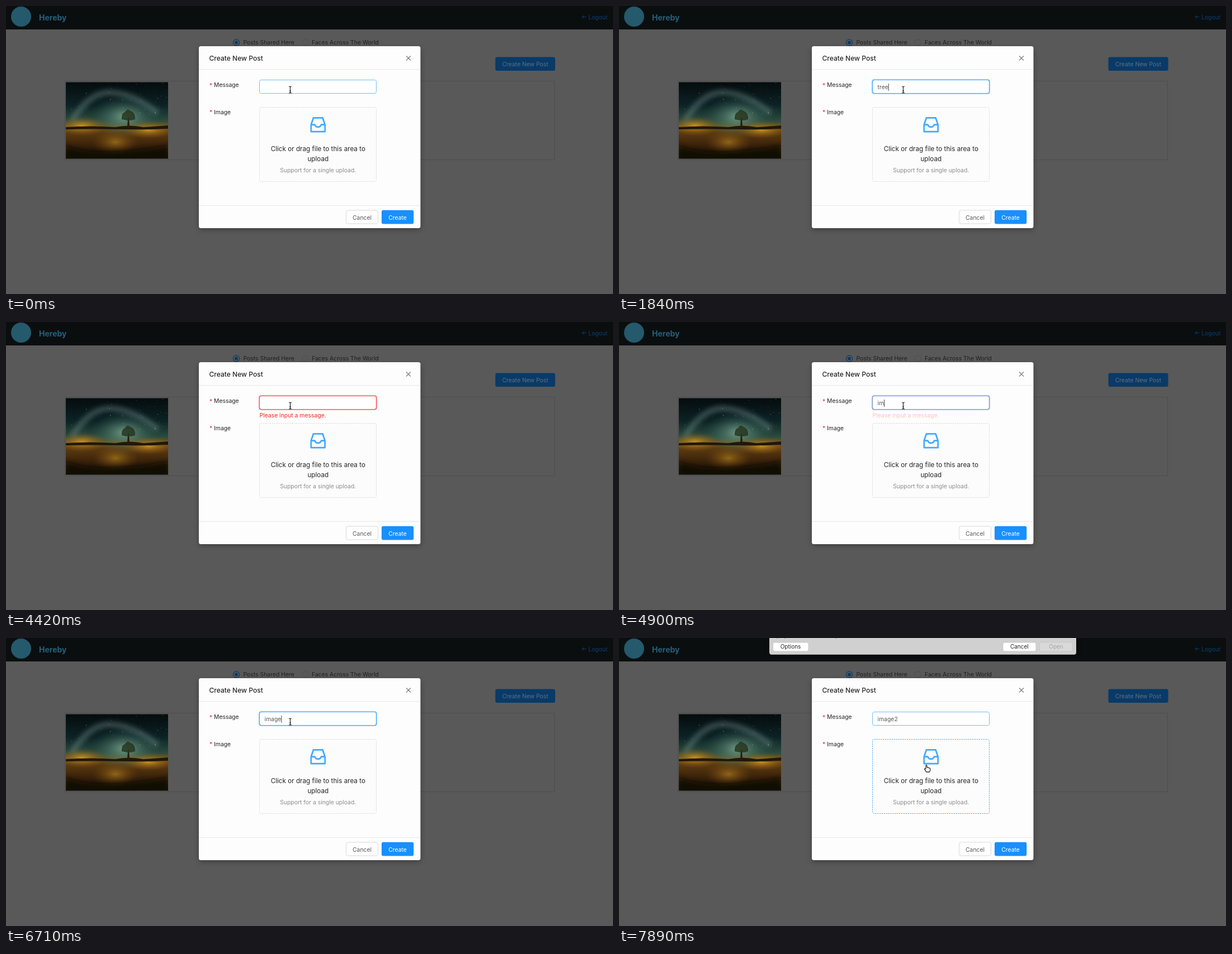
Animation, 1086 px wide and 516 px high, one loop 8 s. Source, as an HTML page:

```html
<!DOCTYPE html>
<html lang="en">
<head>
<meta charset="utf-8">
<title>Create New Post</title>
<style>
  html, body { margin: 0; width: 100%; height: 100%; overflow: hidden; background: #595959; }
  svg { display: block; width: 100vw; height: 100vh; }
  text { font: 10.4px Inter, "Open Sans", sans-serif; fill: #262626; white-space: pre; }
  .mid { text-anchor: middle; }
  .dim { fill: #1f1f1f; }
  .required { fill: #f5222d; }
  .line { fill: none; stroke: #e8e8e8; }
  .lead { font-size: 11.7px; }
</style>
</head>
<body>
<svg viewBox="0 0 1086 516">
  <defs>
    <linearGradient id="sky" x2="0" y2="1">
      <stop offset="0" stop-color="#050b0d"/>
      <stop offset=".3" stop-color="#0c2225"/>
      <stop offset=".5" stop-color="#2a4a3d"/>
      <stop offset=".58" stop-color="#6a5a20"/>
      <stop offset=".66" stop-color="#5b3a10"/>
      <stop offset=".82" stop-color="#3a220a"/>
      <stop offset="1" stop-color="#0e0a06"/>
    </linearGradient>
    <radialGradient id="mint">
      <stop offset="0" stop-color="#7fa892" stop-opacity=".85"/>
      <stop offset="1" stop-color="#2a5a50" stop-opacity="0"/>
    </radialGradient>
    <radialGradient id="amber">
      <stop offset="0" stop-color="#d09a22" stop-opacity=".9"/>
      <stop offset="1" stop-color="#8a5010" stop-opacity="0"/>
    </radialGradient>
    <clipPath id="photoClip"><rect x="107" y="136.5" width="183" height="137"/></clipPath>
    <filter id="soft" x="-30%" y="-30%" width="160%" height="160%"><feGaussianBlur stdDeviation="4"/></filter>
    <filter id="shade" x="-10%" y="-10%" width="120%" height="120%"><feGaussianBlur stdDeviation="5"/></filter>
  </defs>

  <!-- dimmed page -->
  <rect width="1086" height="516" fill="#595959"/>
  <rect width="1086" height="42" fill="#0b0e0f"/>
  <circle cx="27" cy="19" r="18" fill="#25596c"/>
  <text x="59" y="25.5" style="font-size:14px;font-weight:700;fill:#25607a">Hereby</text>
  <path d="M1038 19.5h-7m3-3-3 3 3 3" fill="none" stroke="#0a3f75"/>
  <text x="1042" y="23.5" style="fill:#0a3f75">Logout</text>

  <circle cx="412" cy="65.5" r="5.6" fill="none" stroke="#093a68" stroke-width="1.1"/>
  <circle cx="412" cy="65.5" r="3" fill="#093a68"/>
  <circle cx="535" cy="65.5" r="5.6" fill="none" stroke="#4f4f4f"/>
  <text class="dim" x="424.5" y="69.3">Posts Shared Here</text>
  <text class="dim" x="547" y="69.3">Faces Across The World</text>
  <rect x="875.5" y="91.5" width="107" height="24.5" rx="3" fill="#093a68"/>
  <text class="mid" x="929" y="107.6" style="fill:#64707b">Create New Post</text>
  <rect x="105.5" y="134.5" width="876" height="141" fill="none" stroke="#4d4d4d"/>

  <g clip-path="url(#photoClip)">
    <rect x="107" y="136" width="183" height="138" fill="url(#sky)"/>
    <ellipse cx="212" cy="198" rx="62" ry="38" fill="url(#mint)"/>
    <path d="M118 206Q150 152 190 155T272 192" fill="none" stroke="#7c9c98" stroke-width="10" opacity=".4" filter="url(#soft)"/>
    <ellipse cx="136" cy="215" rx="46" ry="18" fill="url(#amber)"/>
    <ellipse cx="255" cy="222" rx="48" ry="16" fill="url(#amber)"/>
    <ellipse cx="196" cy="244" rx="42" ry="22" fill="url(#amber)" opacity=".6"/>
    <g id="stars" fill="#b8c8c4"></g>
    <path d="M107 217Q150 214 196 217Q220 212 246 217L290 214V220Q240 222 218 221Q150 220 107 221Z" fill="#21170a"/>
    <path d="M217 218L218 200H220L221 218Z" fill="#2a1a0a"/>
    <path d="M207 203Q206 192 213 190Q217 182 223 188Q232 191 231 203Q222 207 207 203Z" fill="#26351d" opacity=".85"/>
    <path d="M107 273V250Q135 262 180 262T290 250V274Z" fill="#0d0905" opacity=".8" filter="url(#soft)"/>
  </g>

  <!-- modal -->
  <rect x="345" y="76" width="397" height="325" rx="4" opacity=".3" filter="url(#shade)"/>
  <rect x="345" y="72" width="396.5" height="326" rx="3.5" fill="#fdfdfd"/>
  <path class="line" d="M345 113.5h396.5M345 357.5h396.5"/>
  <text x="363.5" y="97.7" style="font-size:12.05px;font-weight:500">Create New Post</text>
  <path d="M716 89.5l8 8m0-8-8 8" stroke="#7d7d7d" stroke-width="1.2"/>
  <text class="required" x="364" y="145.5">*</text>
  <text x="372" y="145">Message</text>
  <text class="required" x="364" y="194.3">*</text>
  <text x="372" y="193.8">Image</text>

  <rect x="453.5" y="132.5" width="209" height="24" rx="3" fill="#fff" stroke="#70bdfc"/>
  <g id="focusRing" fill="none" stroke="#1890ff">
    <rect x="452.5" y="131.5" width="211" height="26" rx="4" stroke-width="1.5" opacity=".3"/>
    <rect x="453.5" y="132.5" width="209" height="24" rx="3" stroke="#40a9ff" stroke-width="1.2"/>
  </g>
  <g id="errorState">
    <g fill="none" stroke="#f5222d">
      <rect x="452.5" y="131.5" width="211" height="26" rx="4" stroke-width="1.5" opacity=".3"/>
      <rect x="453.5" y="132.5" width="209" height="24" rx="3" stroke="#ff4d4f" stroke-width="1.2"/>
    </g>
    <text class="required" x="453.5" y="171">Please input a message.</text>
  </g>
  <text id="message" x="462.5" y="149.3" style="fill:#595959"></text>
  <rect id="caret" y="139" width="1" height="13" fill="#444"/>

  <rect id="dropArea" x="453.5" y="181.5" width="209" height="133" rx="3" fill="#fcfcfc" stroke-dasharray="2.3 1.6"/>
  <g fill="none" stroke="#40a9ff" stroke-width="2.7" stroke-linejoin="round">
    <path d="M550 200.3h16.5l4.2 12.4v12.4h-24.9v-12.4z"/>
    <path d="M546 212.7h6.5q1.5 4.2 5.7 4.2t5.7-4.2h6.5"/>
  </g>
  <text class="mid lead" x="558.3" y="259.8">Click or drag file to this area to</text>
  <text class="mid lead" x="558.3" y="278">upload</text>
  <text class="mid" x="558.2" y="298" style="fill:#8c8c8c">Support for a single upload.</text>

  <rect x="608.5" y="366" width="57" height="24" rx="3" fill="#fff" stroke="#d9d9d9"/>
  <text class="mid" x="637" y="382.6" style="fill:#595959">Cancel</text>
  <rect x="672" y="365.7" width="57.3" height="24.7" rx="3" fill="#1890ff"/>
  <text class="mid" x="700.6" y="382.6" style="fill:#fff">Create</text>

  <!-- file sheet -->
  <g id="sheet">
    <rect x="268" y="-10" width="551" height="41.5" rx="5" opacity=".3" filter="url(#shade)"/>
    <rect x="269" y="-10" width="549" height="39.7" rx="4" fill="#d0d0d0"/>
    <path d="M282 .5h2m12 0h2m89 0h2" stroke="#8c8c8c"/>
    <g fill="#fff" stroke="#b9b9b9" stroke-width=".6">
      <rect x="275.5" y="8" width="63.5" height="15.8" rx="3"/>
      <rect x="687" y="8" width="59" height="15.8" rx="3"/>
      <rect x="752.5" y="8" width="59" height="15.8" rx="3" fill="#d9d9d9" stroke="#c0c0c0"/>
    </g>
    <text class="mid" x="307" y="19.4" style="font-size:10px">Options</text>
    <text class="mid" x="716.3" y="19.4" style="font-size:10px">Cancel</text>
    <text class="mid" x="782" y="19.4" style="font-size:10px;fill:#a6a6a6">Open</text>
  </g>

  <!-- pointers, hot spot near the origin -->
  <g id="pointer">
    <path id="beam" d="M-2.5-6Q0-6 0-4.5Q0-6 2.5-6M0-4.5V4.5M-2.5 6Q0 6 0 4.5Q0 6 2.5 6M-1.5 2h3" fill="none" stroke="#111" stroke-width="1.1"/>
    <path id="arrow" d="M-2-6V5L.5 2.6 2.2 6.4 3.8 5.7 2.2 2H5.6Z" fill="#111" stroke="#fff" stroke-width=".8"/>
    <path id="hand" d="M-2.6 1.2V-5Q-1.6-7-.5-5V-1.3Q.8-2.4 1.6-.9Q2.8-1.8 3.5-.4Q5.3-.9 5.3 1V3.4L4 6.6H-1.5L-5 1.6Q-5.2-.4-2.6 1.2Z" fill="#fff" stroke="#111" stroke-width="1.1" stroke-linejoin="round"/>
  </g>
</svg>
<script>
  const LOOP = 8000, STEP = 151.5;
  const el = id => document.getElementById(id);
  const [message, caret, focusRing, errorState, dropArea, sheet, pointer] =
    ['message', 'caret', 'focusRing', 'errorState', 'dropArea', 'sheet', 'pointer'].map(el);

  const keys = [
    [250, ''], [650, 't'], [950, 'tr'], [1250, 'tre'], [1400, 'tree'],
    [2980, 'tre'], [3250, 'tr'], [3500, 't'], [3750, ''],
    [4650, 'i'], [4800, 'im'], [4900, 'ima'], [5000, 'imag'],
    [6300, 'image'], [6800, 'image2']
  ];
  const FOCUS = 250, BLUR = 7400, ERROR = 3750, FIXED = 4650;

  const clamp = v => Math.min(1, Math.max(0, v));
  const ease = v => v * v * (3 - 2 * v);
  const ramp = (t, start, length) => ease(clamp((t - start) / length));
  const fade = (t, on, off) => ramp(t, on, 300) - ramp(t, off, 300);
  const show = (node, visible) => { node.style.display = visible ? '' : 'none'; };

  let seed = 7;
  const random = () => (seed = seed * 16807 % 2147483647) / 2147483647;
  let stars = '';
  for (let i = 0; i < 70; i++) {
    const x = 108 + random() * 180, y = 137 + random() * 62;
    stars += `<circle cx="${x}" cy="${y}" r="${0.2 + random() * 0.45}" opacity="${0.3 + random() * 0.5}"/>`;
  }
  el('stars').innerHTML = stars;

  function drawField(t) {
    const [pressed, value] = keys.filter(k => k[0] <= t).pop() || [0, ''];
    message.textContent = value;
    const width = value ? message.getComputedTextLength() : 0;
    caret.setAttribute('x', 462.5 + width);
    show(caret, t >= FOCUS && t < BLUR && (t - pressed) % 1000 < 500);
    const error = fade(t, ERROR, FIXED);
    errorState.style.opacity = error;
    focusRing.style.opacity = fade(t, FOCUS, BLUR - 150) * (1 - error);
  }

  function drawPointer(t) {
    const p = ramp(t, 6850, 600);
    const x = 508.5 + 43 * p, y = 150 + 83.5 * p;
    pointer.setAttribute('transform', `translate(${x} ${y})`);
    const kind = y < 157 ? 'beam' : y < 181 ? 'arrow' : 'hand';
    for (const id of ['beam', 'arrow', 'hand']) show(el(id), id === kind);
    dropArea.setAttribute('stroke', kind === 'hand' ? '#40a9ff' : '#d9d9d9');
  }

  const begin = performance.now();
  function frame() {
    const now = (performance.now() - begin) % LOOP;
    const t = Math.floor(now / STEP) * STEP;
    drawField(t);
    drawPointer(t);
    show(sheet, now >= 7890);
    requestAnimationFrame(frame);
  }
  frame();
</script>
</body>
</html>
```
